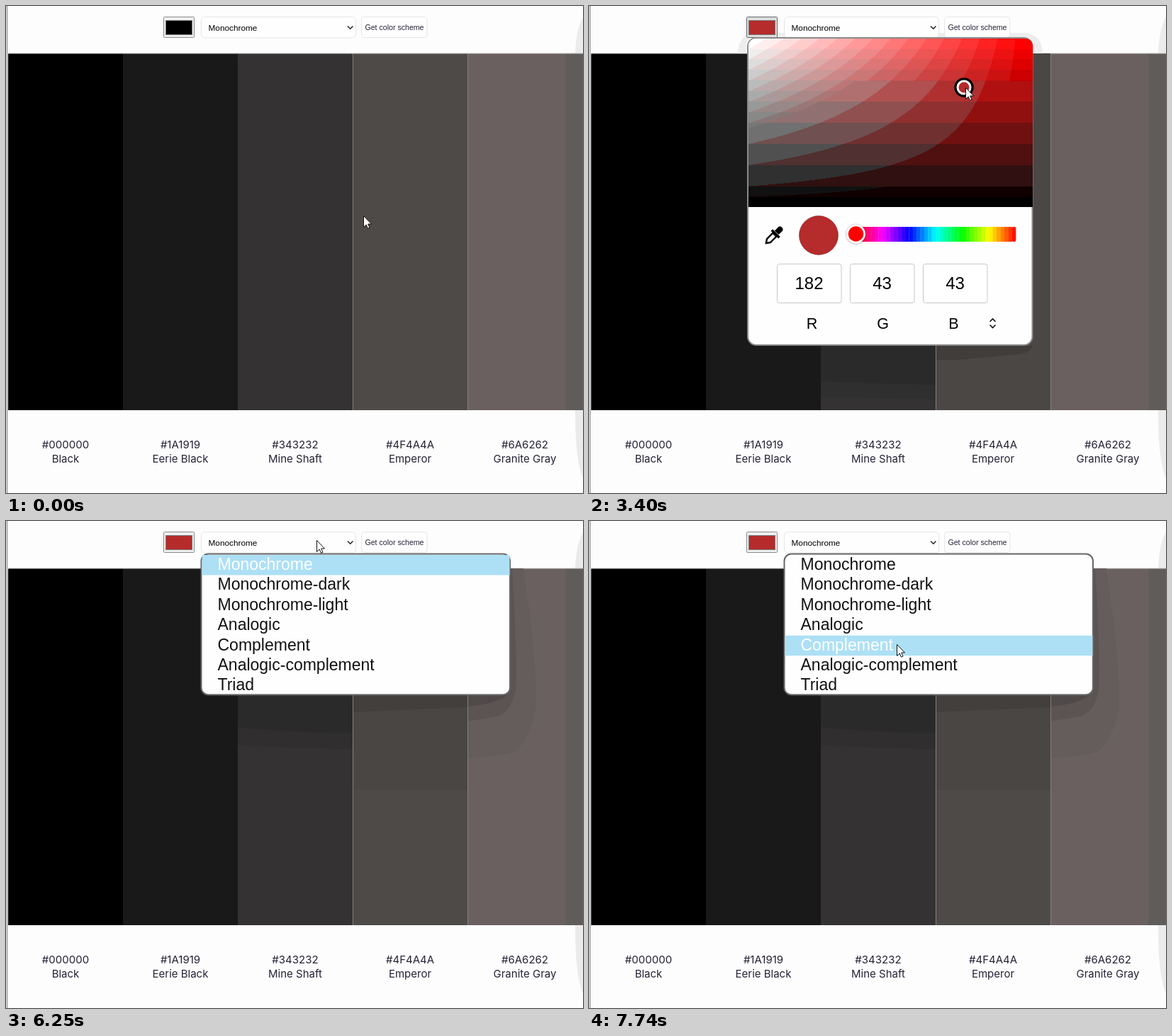
An HTML page with a canvas that plays this animation: 814 by 688 pixels, repeating every 8000 ms.

```html
<!DOCTYPE html>
<html lang="en">
<head>
<meta charset="utf-8">
<title>Color scheme generator</title>
<style>
html, body { margin: 0; width: 100%; height: 100%; overflow: hidden; background: #fdfdfd; }
svg { display: block; width: 814px; height: 688px; }
text { font-family: "Liberation Sans", Arial, sans-serif; }
.label { font: 15px Inter, sans-serif; fill: #252336; text-anchor: middle; }
.mid { text-anchor: middle; }
canvas { display: block; border-radius: 10px 10px 0 0; }
</style>
</head>
<body>
<svg viewBox="0 0 814 688" xmlns="http://www.w3.org/2000/svg">
  <defs>
    <clipPath id="fieldClip"><rect x="224.5" y="46" width="401" height="238"/></clipPath>
  </defs>

  <rect width="814" height="688" fill="#fdfdfd"/>
  <path d="M814 15Q803 36 803 72V575Q803 642 814 668Z" fill="#ebebeb"/>
  <g id="stripes"></g>
  <path d="M1.5 0V688" stroke="#777"/>
  <path d="M3 67H814" stroke="#bbb"/>

  <g id="pickerShade">
    <path d="M210 67Q211 38 236 38H614Q639 39 640 67Z" fill="#ededed"/>
    <path d="M327 480H489V556Q410 553 327 553Z" fill="#302f2f"/>
    <path d="M327 480H489V535Q410 534 327 530Z" fill="#2b2a2a"/>
    <path d="M490 67H651V570H490Z" fill="#4b4745"/>
    <path d="M490 480H626Q622 490 606 492L520 500H490Z" fill="#403d3b"/>
    <path d="M222 67V55Q222 45 232 45H616Q626 45 626 55V67Z" fill="#fdfdfd"/>
  </g>

  <g id="listShade">
    <path d="M327 245H489V322Q400 321 327 317Z" fill="#302e2e"/>
    <path d="M327 245H489V300Q400 299 327 291Z" fill="#2b2a2a"/>
    <path d="M490 245H651V380H490Z" fill="#4a4644"/>
    <path d="M490 245H651V263L490 270Z" fill="#423f3d"/>
    <path d="M652 67H730Q749 190 748 260Q742 305 718 326Q690 334 652 335Z" fill="#655d5c"/>
    <path d="M652 67H714Q722 200 719 240Q712 270 694 276L652 283Z" fill="#5b5453"/>
    <path d="M652 245H708Q690 259 652 262Z" fill="#4f4a49"/>
  </g>

  <g id="header">
    <rect id="swatchFrame" x="222.5" y="15.5" width="43" height="29" rx="1"/>
    <rect id="swatch" x="225.5" y="20.5" width="37" height="20" stroke="#777"/>
    <rect x="275.5" y="15.5" width="218" height="29.5" rx="5" fill="#fefefe" stroke="#e6e6e6"/>
    <text x="285.5" y="34.5" font-size="11.8">Monochrome</text>
    <path d="M482 28.5l3.7 3.7 3.7-3.7" fill="none" stroke="#222" stroke-width="1.5"/>
    <rect x="501.5" y="15.5" width="92.5" height="29" rx="4" fill="#fefefe" stroke="#e6e6e6"/>
    <text x="548" y="34" font-size="10.6" fill="#252336" class="mid">Get color scheme</text>
  </g>

  <rect id="outline" x="223" y="45.5" width="403" height="434.5" rx="12" fill="none" stroke="#555" stroke-width="3"/>

  <g id="picker">
    <rect x="224" y="45" width="401.5" height="434" rx="12" fill="#fefefe" stroke="#8a8a8a" stroke-width="2"/>
    <foreignObject x="224.5" y="46" width="401" height="239"><canvas id="field" width="401" height="238"></canvas></foreignObject>
    <g id="marker" clip-path="url(#fieldClip)">
      <g id="ring">
        <circle r="12" fill="none" stroke="#000" stroke-width="3.5"/>
        <circle id="ringFill" r="9" stroke="#fff" stroke-width="3"/>
      </g>
    </g>
    <g transform="translate(260.5 324.5) rotate(45)">
      <path d="M-3.5 -2V10L0 15L3.5 10V-2Z" fill="#fff" stroke="#000" stroke-width="2.4"/>
      <path d="M-7.5 -5.5H7.5V-2H-7.5ZM-4 -6V-13Q-4 -16.500 0 -16.500T4 -13V-6Z"/>
    </g>
    <circle id="preview" cx="324" cy="324" r="27.7" stroke="#0003"/>
    <g id="hues"></g>
    <circle cx="376.500" cy="322.500" r="15" fill="#0002"/>
    <circle cx="376.500" cy="322" r="13.500" fill="#fff"/>
    <circle cx="376.500" cy="322" r="10.700" fill="#f00"/>
    <g id="inputs"></g>
    <path d="M565.500 446l4-4 4 4M565.500 450.500l4 4 4-4" fill="none" stroke="#111" stroke-width="1.6"/>
  </g>

  <g id="list">
    <rect x="275.5" y="46.500" width="435.5" height="199" rx="10" fill="#fefefe" stroke="#666" stroke-width="2"/>
    <rect id="highlight" x="276.500" width="434" height="28.45" fill="#ade0f5"/>
    <g id="options" font-size="23"></g>
  </g>

  <path id="arrow" d="M.5 .5V16.500L4.200 13 6.500 18.300 9 17.200 6.700 12H11.500Z" fill="#fff" stroke="#111"/>
  <path id="hand" d="M3.500 2Q3.500 .5 5 .5T6.700 2V7Q8.500 6 9.500 7.500 11.500 6.800 12.300 8.500 15.500 8 15.500 11V14Q15 16 13.500 18.500H6.500Q5 16 1 11.500 0 9.500 1.500 9.300 2.800 9.500 3.700 11ZM7.500 13V16M10 13V16M12.300 13V16" fill="#fff" stroke="#111"/>
</svg>

<script>
const LOOP = 8000;
const ROW = 28.45, LIST_TOP = 48;
const PICKED = [182, 43, 43];
const $ = id => document.getElementById(id);
const rgb = c => `rgb(${c})`;
const fill = (id, items, make) => { $(id).innerHTML = items.map(make).join(''); };

const scheme = [
  ['#000000', 'Black', '#000000'], ['#1A1919', 'Eerie Black', '#1a1919'],
  ['#343232', 'Mine Shaft', '#343232'], ['#4F4A4A', 'Emperor', '#4e4a48'],
  ['#6A6262', 'Granite Gray', '#6a6060']
];
fill('stripes', scheme, ([code, name, color], i) => {
  const x = 3 + 162 * i;
  return `<rect x="${x}" y="67" width="163" height="504" fill="${color}"/>
    ${i > 2 ? `<path d="M${x + .5} 67V571" stroke="#858080"/>` : ''}
    ${i > 3 ? '<rect x="789" y="67" width="25" height="504" fill="#605c5a"/>' : ''}
    <text class="label" x="${x + 81}" y="624.5">${code}</text>
    <text class="label" x="${x + 81}" y="645">${name}</text>`;
});

fill('hues', [...Array(42).keys()], i => {
  const w = 226 / 42;
  return `<rect x="${376 + i * w}" y="312" width="${w + .3}" height="21"
    rx="${i === 41 ? 2 : 0}" fill="hsl(${360 - (i + .5) * 360 / 42} 100% 50%)"/>`;
});

fill('inputs', ['R', 'G', 'B'], (name, i) => {
  const x = 265.5 + 103 * i;
  return `<rect x="${x}" y="364.5" width="90.500" height="55" rx="3" fill="#fff" stroke="#c8c8c8"/>
    <text class="mid value" x="${x + 45}" y="400" font-size="24"></text>
    <text class="mid" x="${314.5 + 100 * i}" y="456" font-size="21.500">${name}</text>`;
});
const values = document.querySelectorAll('.value');

const options = ['Monochrome', 'Monochrome-dark', 'Monochrome-light', 'Analogic',
  'Complement', 'Analogic-complement', 'Triad'];
fill('options', options, (name, i) => `<text x="298.500" y="${69 + i * 28.400}">${name}</text>`);
const optionTexts = [...$('options').children];

// Saturation/value field, posterized into coarse bands in the mid tones.
function paintField() {
  const ctx = $('field').getContext('2d');
  const { width, height } = ctx.canvas;
  const image = ctx.createImageData(width, height);
  for (let y = 0, p = 0; y < height; y++) {
    for (let x = 0; x < width; x++, p += 4) {
      const red = 255 * (1 - y / height);
      const other = red * (1 - x / width);
      const fine = red > 191 || red < 32 || other > 120;
      const band = c => fine ? Math.floor(c / 16) * 17 : Math.floor(c / 32) * 32 + 16;
      image.data.set([band(red), band(other), band(other), 255], p);
    }
  }
  ctx.putImageData(image, 0, 0);
}
paintField();

// Each move: start, end, steps, whether the first step only jumps to the start point, path points.
const moves = [
  [150, 1140, 8, 0, [504, 296], [350, 190], [244, 33]],
  [2070, 3100, 8, 1, [298, 97], [410, 95], [530, 115]],
  [3250, 3400, 2, 0, [530, 115], [530, 115], [531, 115]],
  [3800, 4700, 8, 0, [531, 115], [600, 150], [694, 48]],
  [5220, 6250, 8, 1, [694, 48], [560, 52], [438, 27]],
  [6620, 6890, 3, 0, [438, 27], [440, 58], [441, 90]],
  [7030, 7580, 5, 0, [441, 90], [440, 130], [434, 169]],
  [7740, 7740, 1, 0, [434, 169], [434, 171], [434, 174]]
];

function cursorAt(t) {
  const move = moves.findLast(m => t >= m[0]) || moves[0];
  const [start, end, steps, jump, a, b, c] = move;
  const gap = (end - start) / (steps - 1) || 1;
  const count = t < start ? 0 : Math.min(steps, Math.floor((t - start + 5) / gap) + 1);
  const k = Math.max(0, count - jump) / (steps - jump);
  const u = steps === 8 ? k * k * (3 - 2 * k) : k;
  return [0, 1].map(i => (1 - u) ** 2 * a[i] + 2 * u * (1 - u) * b[i] + u * u * c[i]);
}

const show = (id, on) => $(id).setAttribute('display', on ? 'inline' : 'none');
const set = (id, attrs) => {
  for (const name in attrs) $(id).setAttribute(name, attrs[name]);
};

function render(t) {
  const [x, y] = cursorAt(t);
  const picked = t >= 3250;
  const color = picked ? PICKED : [0, 0, 0];
  const hovered = t >= 1140 && t < 3800;
  const listOpen = t >= 6250;

  set('swatch', { fill: rgb(color) });
  set('swatchFrame', { fill: hovered ? '#dedede' : '#efefef', stroke: hovered ? '#666' : '#8a8a8a' });

  show('pickerShade', t >= 1540 && t < 5220);
  show('outline', t >= 1540 && t < 2070);
  set('outline', { opacity: t < 1660 ? .2 : .45 });
  show('picker', t >= 2070 && t < 5220);
  set('preview', { fill: rgb(color) });
  set('ring', { transform: picked ? 'translate(529 115)' : 'translate(225.500 282)' });
  set('ringFill', { fill: rgb(color) });
  values.forEach((el, i) => { el.textContent = color[i]; });

  show('listShade', listOpen);
  show('list', listOpen);
  const active = Math.max(0, Math.floor((y - LIST_TOP) / ROW));
  set('highlight', { y: LIST_TOP + active * ROW });
  optionTexts.forEach((el, i) => el.setAttribute('fill', i === active ? '#fff' : '#111'));

  const pointing = y < 45 && x < 266;
  show('hand', pointing);
  show('arrow', !pointing);
  set('hand', { transform: `translate(${x - 4} ${y - 1})` });
  set('arrow', { transform: `translate(${x} ${y})` });
}

const origin = performance.now();
function tick() {
  render((performance.now() - origin) % LOOP);
  requestAnimationFrame(tick);
}
tick();
</script>
</body>
</html>
```
